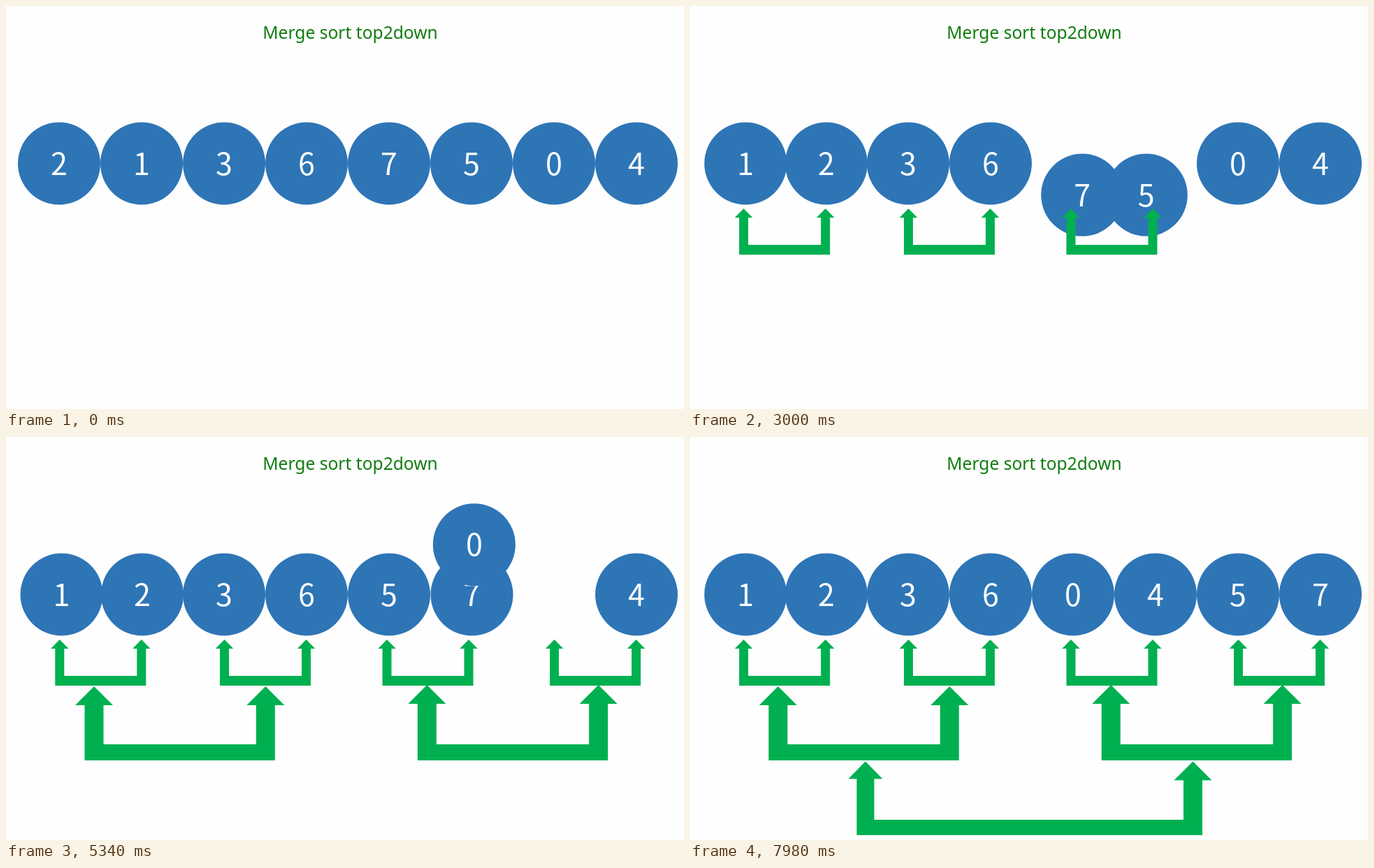
These frames come from a looping animation (970 by 577 pixels, 8000 ms). An HTML page with a canvas:

```html
<!DOCTYPE html>
<html lang="en">
<head>
<meta charset="utf-8">
<title>Merge sort</title>
<style>
  html, body { margin: 0; width: 100%; height: 100%; overflow: hidden; background: #fefefe; }
  canvas { display: block; }
</style>
</head>
<body>
<canvas id="stage" width="970" height="577"></canvas>
<script>
const ctx = document.getElementById('stage').getContext('2d');
const LOOP = 8000, STEP = 60;
const BLUE = '#2e75b6', GREEN = '#00b050';
const R = 59, ROW = 225.5, DIP = 131, DROP = 65;

const slot = i => 76 + 118 * i;
const clamp = p => Math.min(1, Math.max(0, p));
const progress = (t, start, dur) => clamp((t - start) / dur);
const ease = p => p < 0.5 ? 2 * p * p : 1 - 2 * (1 - p) * (1 - p);
const mix = (a, b, u) => a + (b - a) * u;

const balls = [2, 1, 3, 6, 7, 5, 0, 4].map((n, i) => ({ n, x: slot(i), moves: [] }));
const ball = n => balls.find(b => b.n === n);

// A swap follows a half sine wave below the row.
function swap(left, right, xLeft, xRight, start) {
  ball(left).moves.push({ x: xRight, y: ROW, start, dur: 875, dip: DIP });
  ball(right).moves.push({ x: xLeft, y: ROW, start, dur: 875, dip: DIP });
}
swap(2, 1, 79.5, 195, 870);
swap(7, 5, 548, 666.5, 2793);

// The right half is lifted out in order, then lowered together.
[[0, 544, 75.5], [4, 665.5, 74], [5, 788.5, 74], [7, 901, 78.5]].forEach(([n, x, y], i) => {
  ball(n).moves.push(
    { x, y, start: 5102 + 488 * i, dur: 488, dip: 0 },
    { x: slot(4 + i), y: ROW, start: 7054, dur: 461, dip: 0 });
});

const small = (x, start, dur) => ({
  start, dur, top: 290, bottom: 356, bar: 14, lap: 2.5,
  left: { x, half: 12.75, shaft: 6.5, head: 13 },
  right: { x: x + 117, half: 12.75, shaft: 6.5, head: 13 }
});
const large = (x, top, start) => ({
  start, dur: 480, top, bottom: 463, bar: 23, lap: 5,
  left: { x, half: 27, shaft: 13.5, head: 27 },
  right: { x: x + 245.3, half: 27, shaft: 13.5, head: 27 }
});
const brackets = [
  small(76.8, 350, 500),
  small(312.5, 1767, 495),
  small(545, 2262, 500),
  small(784.5, 3672, 480),
  large(126, 357, 4152),
  large(602.3, 355, 4632),
  {
    start: 7515, dur: 465, top: 464.5, bottom: 570, bar: 22, lap: 5,
    left: { x: 251, half: 24.5, shaft: 12.5, head: 25 },
    right: { x: 719.5, half: 27, shaft: 13.5, head: 27 }
  }
];

function place(b, t) {
  let x = b.x, y = ROW;
  for (const m of b.moves) {
    if (t <= m.start) break;
    const u = ease(progress(t, m.start, m.dur));
    x = mix(x, m.x, u);
    y = mix(y, m.y, u) + m.dip * Math.sin(Math.PI * u);
  }
  return { x, y };
}

function drawBall(b, t) {
  const { x, y } = place(b, t);
  ctx.fillStyle = BLUE;
  ctx.beginPath();
  ctx.arc(x, y, R, 0, 2 * Math.PI);
  ctx.fill();
  ctx.fillStyle = '#fff';
  ctx.font = '300 43px "Noto Sans CJK SC", "Noto Sans CJK JP", "Open Sans", sans-serif';
  ctx.fillText(b.n, x, y + 16);
}

function poly(points) {
  ctx.beginPath();
  points.forEach(([x, y]) => ctx.lineTo(x, y));
  ctx.fill();
}

// Tip and head of an upward arrow, from the left neck to the right neck.
function headPoints({ x, half, shaft, head }, top) {
  const neck = top + head;
  return [[x - shaft, neck], [x - half, neck], [x, top], [x + half, neck], [x + shaft, neck]];
}

function drawBracket(k, t) {
  if (t <= k.start) return;
  const p = progress(t, k.start, k.dur);
  const { left, right, top, bottom, bar, lap } = k;
  ctx.save();
  ctx.globalAlpha = p ** 0.8;
  ctx.translate(0, -DROP * (1 - p));
  ctx.fillStyle = GREEN;
  poly([[left.x - left.shaft, bottom], ...headPoints(left, top), [left.x + left.shaft, bottom]]);
  poly([
    [left.x + lap, bottom], [left.x + lap, bottom - bar], [right.x - right.shaft, bottom - bar],
    ...headPoints(right, top), [right.x + right.shaft, bottom]
  ]);
  ctx.restore();
}

function draw(t) {
  ctx.fillStyle = '#fefefe';
  ctx.fillRect(0, 0, 970, 577);
  ctx.textAlign = 'center';
  balls.forEach(b => drawBall(b, t));
  brackets.forEach(k => drawBracket(k, t));
  ctx.fillStyle = '#107c10';
  ctx.font = '24.6px "Noto Sans", "Open Sans", sans-serif';
  ctx.fillText('Merge sort top2down', 492.5, 47);
}

const origin = performance.now();
function tick() {
  const t = (performance.now() - origin) % LOOP;
  draw(Math.floor(t / STEP) * STEP);
  requestAnimationFrame(tick);
}
tick();
</script>
</body>
</html>
```
